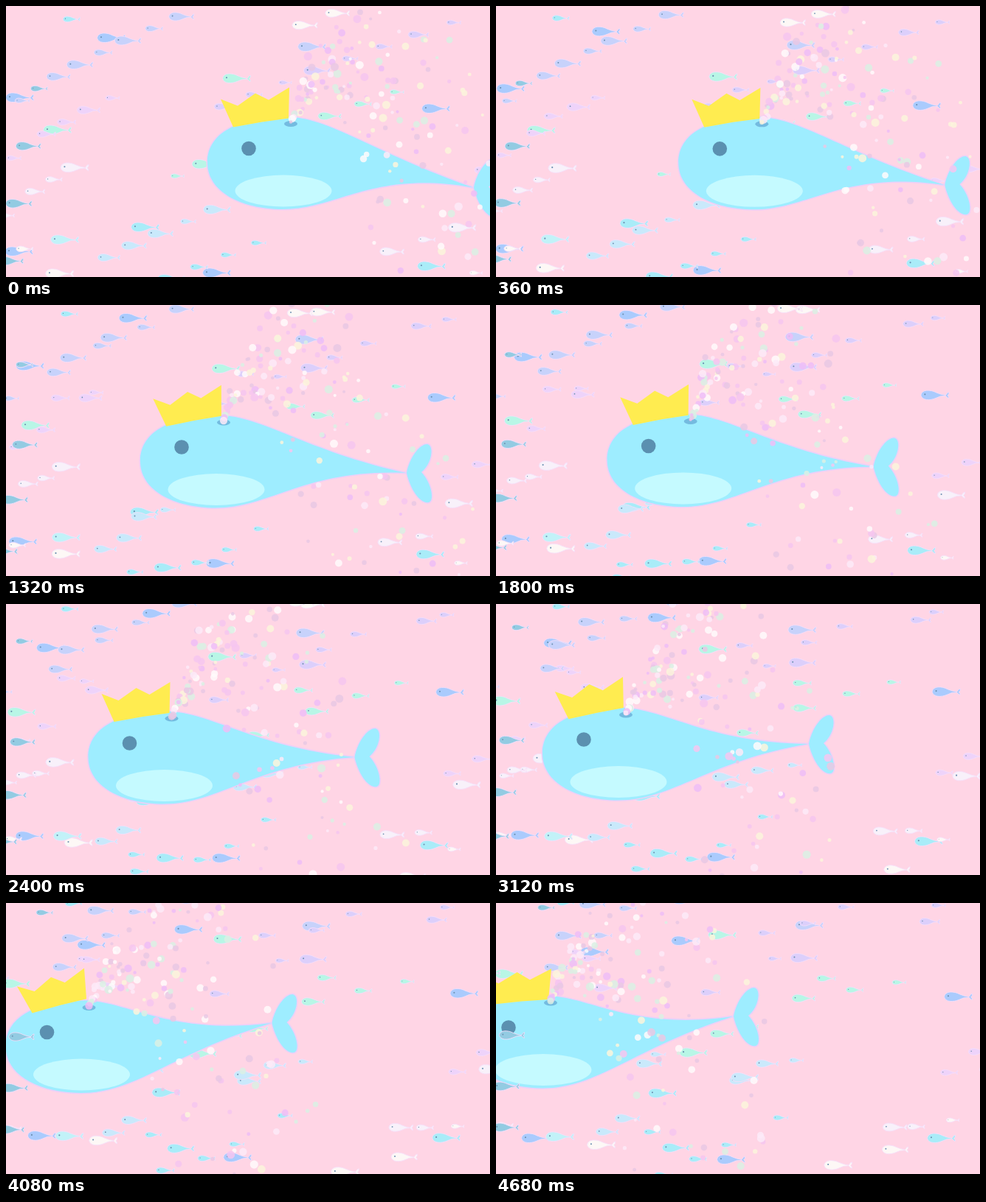
Write an HTML page with a canvas that moves like this. It is 656x368 px and loops after 4.8 s.

```html
<!DOCTYPE html>
<html lang="en">
<head>
<meta charset="utf-8">
<title>Whale with a crown</title>
<style>
html, body { margin: 0; width: 100%; height: 100%; overflow: hidden; background: #ffd5e5; }
canvas { display: block; }
</style>
</head>
<body>
<canvas id="stage" width="656" height="368"></canvas>
<script>
const ctx = document.getElementById('stage').getContext('2d');
const W = 656, H = 368, STEP = 120, STEPS = 40, TAU = Math.PI * 2;

// Smooth curve through values at the key steps; linear before the first one.
const KEYS = [0, 6, 11, 20, 26, 34, 39];
function curve(v, n) {
  const last = KEYS.length - 1;
  const slope = i => {
    const a = Math.max(0, i - 1), b = Math.min(last, i + 1);
    return (v[b] - v[a]) / (KEYS[b] - KEYS[a]);
  };
  if (n <= 0) return v[0] + n * slope(0);
  let i = 0;
  while (i < last - 1 && n > KEYS[i + 1]) i++;
  const d = KEYS[i + 1] - KEYS[i], u = (n - KEYS[i]) / d, w = 1 - u;
  return v[i] * (1 + 2 * u) * w * w + slope(i) * d * u * w * w +
    v[i + 1] * u * u * (3 - 2 * u) - slope(i + 1) * d * u * u * w;
}

const eyeX = n => curve([329, 278, 238, 167.5, 119, 55.5, 17], n);
const eyeY = n => n < 0 ? 193.5 : curve([193.5, 194, 193, 189, 184, 175.5, 169], n);
const tailY = n => curve([53, 45, 35, 19, 6, -12.5, -15], n);
const crownTilt = n => curve([0, 0, -1.5, 0, -2.5, -5.5, 4], n) * Math.PI / 180;

function rand(seed) {
  let t = (seed + 0x6d2b79f5) | 0;
  t = Math.imul(t ^ (t >>> 15), t | 1);
  t ^= t + Math.imul(t ^ (t >>> 7), t | 61);
  return ((t ^ (t >>> 14)) >>> 0) / 4294967296;
}

function ellipse(x, y, rx, ry, fill) {
  ctx.beginPath();
  ctx.ellipse(x, y, rx, ry, 0, 0, TAU);
  ctx.fillStyle = fill;
  ctx.fill();
}

// ---- fish: each swims along a clockwise arc ----
const BLUE = '#aacbfd', AQUA = '#a9ecf8', MINT = '#b8f6e6', SLATE = '#93cbe2';
const TINTS = ['#dccffb', AQUA, '#f8f1fa', MINT, '#c7d2fb', '#fdf8f6', '#c9e9fb', '#eed3fa'];

// The leaders: x, y, travel x, travel y, tint
const school = [
  [143, 43, 114, 8, BLUE], [19, 124, 115, -58, BLUE], [18, 333, 36, -14, BLUE],
  [73, 363, 70, -35, '#fdf8f6'], [80, 317, 7, 0, '#c2f2f8'], [286, 362, 33, -14, BLUE],
  [583, 139, 44, -12, BLUE], [313, 98, -6, -55, MINT], [70, 168, -52, -72, MINT],
  [189, 300, 37, -42, AQUA], [415, 55, 10, -25, '#c7d2fb'], [577, 353, 27, -34, AQUA]
].map(([x, y, dx, dy, tint]) => ({ x, y, dx, dy, tint, len: 39 }));

// The rest: evenly scattered, denser on the left, mostly rising
for (let i = 1; i <= 64; i++) {
  const r = k => rand(i * 17 + k * 4099);
  const dir = -2.4 + r(1) * 2.1, reach = 12 + 100 * r(2) ** 2;
  school.push({
    x: W * (i * 0.618034 % 1) ** 1.35,
    y: 6 + (H + 50) * (i * 0.754878 % 1),
    dx: Math.cos(dir) * reach,
    dy: Math.sin(dir) * reach,
    len: 18 + 21 * r(3),
    tint: i % 13 ? TINTS[i % TINTS.length] : SLATE
  });
}

const SWEEP = 2.18, LIFT = 0.5 / Math.tan(SWEEP / 2);
function drawFish({ x, y, dx, dy, len, tint }, n) {
  const cx = x + dx / 2 - dy * LIFT, cy = y + dy / 2 + dx * LIFT;
  const a = SWEEP * n / (STEPS - 1), c = Math.cos(a), s = Math.sin(a);
  ctx.save();
  ctx.translate(cx + (x - cx) * c - (y - cy) * s, cy + (x - cx) * s + (y - cy) * c);
  ctx.scale(len, len);
  ctx.beginPath();
  ctx.moveTo(-0.5, 0.01);
  ctx.bezierCurveTo(-0.48, -0.2, -0.16, -0.19, 0.04, -0.08);
  ctx.quadraticCurveTo(0.2, -0.01, 0.36, 0.01);
  ctx.quadraticCurveTo(0.42, -0.1, 0.48, -0.1);
  ctx.quadraticCurveTo(0.49, -0.03, 0.43, 0.02);
  ctx.quadraticCurveTo(0.49, 0.07, 0.47, 0.12);
  ctx.quadraticCurveTo(0.41, 0.1, 0.36, 0.03);
  ctx.quadraticCurveTo(0.18, 0.02, 0.02, 0.11);
  ctx.bezierCurveTo(-0.18, 0.2, -0.46, 0.2, -0.5, 0.01);
  ctx.fillStyle = tint;
  ctx.fill();
  ctx.lineWidth = 1 / len;
  ctx.strokeStyle = 'rgba(246,222,250,.85)';
  ctx.stroke();
  ellipse(-0.36, -0.02, 0.027, 0.027, '#6a8fb0');
  ctx.restore();
}

// ---- whale, drawn around its eye ----
function drawFluke(y) {
  ctx.save();
  ctx.translate(305, y);
  ctx.beginPath();
  ctx.moveTo(0, 0);
  ctx.bezierCurveTo(4, -20, 17, -39, 28, -39);
  ctx.bezierCurveTo(38, -37, 34, -12, 20, -1);
  ctx.bezierCurveTo(34, 14, 38, 38, 30, 40);
  ctx.bezierCurveTo(18, 42, 5, 22, 0, 0);
  ctx.stroke();
  ctx.fill();
  ctx.restore();
}

function drawCrown(tilt) {
  ctx.save();
  ctx.translate(10, -38);
  ctx.rotate(tilt);
  ctx.beginPath();
  [[-48, -29], [-25, -20], [-1, -37], [17, -28], [45, -45], [44, -3], [8, 2], [-31, 9]]
    .forEach(p => ctx.lineTo(...p));
  ctx.closePath();
  ctx.fillStyle = '#ffec50';
  ctx.fill();
  ctx.restore();
}

function drawWhale(n) {
  const ty = tailY(n);
  ctx.save();
  ctx.translate(eyeX(n), eyeY(n));
  ctx.fillStyle = '#9eedff';
  ctx.strokeStyle = '#ecd0f8';
  ctx.lineWidth = 3;
  drawFluke(ty);
  ctx.beginPath();
  ctx.moveTo(-56, 19);
  ctx.bezierCurveTo(-56, -22, -12, -43, 51, -43);
  ctx.bezierCurveTo(108, -43, 168, 5, 304, ty);
  ctx.bezierCurveTo(168, 29, 121, 82.5, 46, 82.5);
  ctx.bezierCurveTo(-12, 82, -56, 58, -56, 19);
  ctx.stroke();
  ctx.fill();
  ellipse(47, 57.5, 65.5, 21.5, '#c5faff');
  ellipse(57, -33.5, 9, 4, '#74bbe0');
  ellipse(0, 0, 9.8, 9.8, '#5b90b0');
  drawCrown(crownTilt(n));
  ctx.restore();
}

// ---- fountain: bubbles leave the blowhole, rise and fall back ----
const FOAM = ['#fffafc', '#efbdf7', '#fbf4dc', '#daf0e4', '#f6c6f0', '#e9c8e4', '#fdeaf8'];
const RATE = 4, LIFE = 42;
function drawFountain(n) {
  ctx.globalAlpha = 0.85;
  for (let i = (n - LIFE) * RATE; i <= n * RATE; i++) {
    const r = k => rand(i * 13 + k * 7919 + 50021);
    const birth = i / RATE, age = n - birth;
    const x = eyeX(birth) + 57 + (r(1) * 5.5 - 5) * age;
    const y = eyeY(birth) - 36 - (8 + r(2) * 10) * age + 0.5 * age * age;
    const size = 2 + r(3) * 3.6;
    ellipse(x, y, size, size, FOAM[Math.floor(r(4) * FOAM.length)]);
  }
  ctx.globalAlpha = 1;
}

function draw(time) {
  const n = Math.floor((time % (STEP * STEPS)) / STEP);
  ctx.fillStyle = '#ffd5e5';
  ctx.fillRect(0, 0, W, H);
  school.forEach(fish => drawFish(fish, n));
  drawWhale(n);
  school.filter(fish => fish.tint === SLATE).forEach(fish => drawFish(fish, n));
  drawFountain(n);
}

const start = performance.now();
function tick() {
  draw(performance.now() - start);
  requestAnimationFrame(tick);
}
tick();
</script>
</body>
</html>
```
